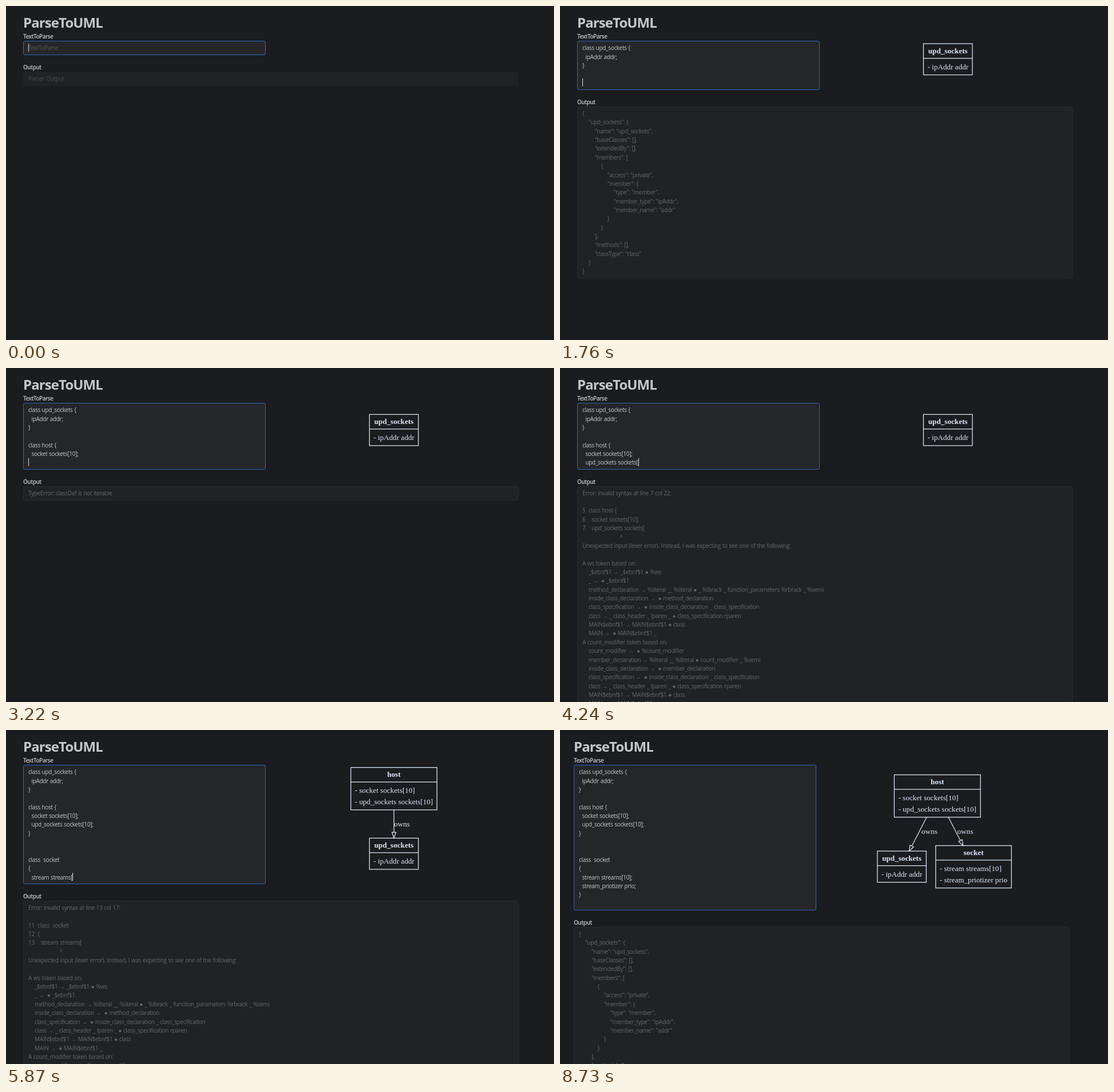
Animation of 958x585 px, one loop 8810 ms. Source, as an HTML page:

```html
<!DOCTYPE html>
<html lang="en">
<head>
<meta charset="utf-8">
<title>ParseToUML</title>
<style>
html, body { margin: 0; width: 100%; height: 100%; overflow: hidden; background: #1b1c1f; }
#page { position: absolute; inset: 0; color: #c6c7ca; font: 10px "Open Sans", "Noto Sans", sans-serif; }
#page > * { position: absolute; box-sizing: border-box; margin: 0; }
h1 { left: 30px; top: 13px; font-size: 24px; line-height: 32px; letter-spacing: -.9px; }
.label { left: 30px; font-size: 10px; font-weight: 600; line-height: 16px; letter-spacing: -.5px; }
pre { left: 30px; padding: 4.2px 8px 0; border: 1px solid; border-radius: 3px; overflow: hidden;
  font: inherit; line-height: 15.36px; letter-spacing: -.31px; word-spacing: .45px; }
#input { top: 61px; width: 424px; background: #25262a; border-color: #3065ba; }
#input.empty { color: #56575b; }
#output { width: 866px; background: #212225; border-color: #2a2b2e; color: #646568; }
#output.empty { border-color: #212225; color: #46474a; }
#caret { width: 1px; height: 14px; background: #e4e4e4; }
svg { left: 0; top: 0; width: 958px; height: 585px; font: 13.15px "Liberation Serif", serif; fill: #dce8fb; }
svg path, svg rect { fill: none; stroke: #dce8fb; stroke-width: 1.25; }
</style>
</head>
<body>
<div id="page">
  <h1>ParseToUML</h1>
  <div class="label" style="top:45px">TextToParse</div>
  <pre id="input"></pre>
  <div id="caret"></div>
  <div class="label" id="outLabel">Output</div>
  <pre id="output"></pre>
  <svg><g id="diagram"></g></svg>
</div>
<script>
const LOOP = 8810, ROW = 15.36, TOP = 61;
const SOURCE = `class upd_sockets {
  ipAddr addr;
}

class host {
  socket sockets[10];
  upd_sockets sockets[10];
}


class  socket
{
  stream streams[10];
  stream_priotizer prio;
}
`;
// [time in ms, characters typed]
const KEYS = [[133, 0], [950, 20], [1760, 38], [1833, 38], [2290, 51], [2353, 51], [3220, 73],
  [4590, 105], [5870, 137], [7010, 167], [7100, 167], [7150, 169]];
const $ = id => document.getElementById(id);

function typedAt(t) {
  if (t < KEYS[0][0]) return 0;
  for (let i = 1; i < KEYS.length; i++) {
    const [t0, a] = KEYS[i - 1], [t1, b] = KEYS[i];
    if (t >= t1) continue;
    const steps = Math.max(1, Math.round((t1 - t0) / 67));
    const k = Math.floor((t - t0) / (t1 - t0) * steps);
    return a + Math.round((b - a) * k / steps);
  }
  return SOURCE.length;
}

const MAIN_RULES = ['MAIN$ebnf$1 → MAIN$ebnf$1 ● class', 'MAIN →  ● MAIN$ebnf$1 _'];
const WS_RULES = ['_$ebnf$1 → _$ebnf$1 ● %ws', '_ →  ● _$ebnf$1'];
const BODY_RULES = kind => [
  `inside_class_declaration →  ● ${kind}_declaration`,
  'class_specification →  ● inside_class_declaration _ class_specification',
  'class → _ class_header _ lparen _ ● class_specification rparen',
  ...MAIN_RULES];
const expected = (token, rules) => [`A ${token} token based on:`, ...rules.map(r => '    ' + r)];

function report(kind, lines, col, cause, tokens) {
  const n = lines.length, pad = String(n).length;
  const context = lines.slice(-3).map((s, i, a) => String(n - a.length + 1 + i).padStart(pad) + '  ' + s);
  return [`Error: ${kind} at line ${n} col ${col}:`, '', ...context, ' '.repeat(pad + 1 + col) + '^',
    `Unexpected ${cause}. Instead, I was expecting to see one of the following:`, '', ...tokens, ''];
}

function toJson(text) {
  const out = {};
  for (const [, name, body] of text.matchAll(/class\s+(\w+)\s*{([^}]*)}/g)) {
    const members = [...body.matchAll(/(\w+) (\w+)/g)].map(m => ({
      access: 'private',
      member: { type: 'member', member_type: m[1], member_name: m[2] }
    }));
    out[name] = { name, baseClasses: [], extendedBy: [], members, methods: [], classType: 'class' };
  }
  return JSON.stringify(out, null, 4).split('\n');
}

const isValid = text => /}\s*$/.test(text);

function parse(text) {
  const lines = text.split('\n'), last = lines[lines.length - 1];
  if (!text) return ['Parser Output'];
  if (isValid(text)) return toJson(text);
  if (/^c(l|la|las)?$/.test(last))
    return report('Syntax error', lines, 1, `literal token: "${last}"`, [
      ...expected('ws', [...WS_RULES, 'MAIN → MAIN$ebnf$1 ● _']),
      ...expected('class_specifier', [
        'class_header →  ● %class_specifier __ %literal class_extention_specializer',
        'class → _ ● class_header _ lparen _ class_specification rparen', ...MAIN_RULES])]);
  if (/\[\d*$/.test(last))
    return report('invalid syntax', lines, last.indexOf('[') + 1, 'input (lexer error)', [
      ...expected('ws', [...WS_RULES,
        'method_declaration → %literal __ %literal ● _ %lbrack _ function_parameters %rbrack _ %semi',
        ...BODY_RULES('method')]),
      ...expected('count_modifier', ['count_modifier →  ● %count_modifier',
        'member_declaration → %literal __ %literal ● count_modifier _ %semi',
        ...BODY_RULES('member')])]);
  return ['TypeError: classDef is not iterable'];
}

function box(x, y, w, title, ...members) {
  const h = 35 + 19.6 * members.length;
  return `<rect x="${x}" y="${y}" width="${w}" height="${h}"/><path d="M${x} ${y + 25.5}h${w}"/>` +
    `<text x="${x + w / 2}" y="${y + 16.6}" text-anchor="middle" font-weight="bold">${title}</text>` +
    members.map((m, i) => `<text x="${x + 7}" y="${y + 44.6 + 19.7 * i}">- ${m}</text>`).join('');
}

function edge(x0, y0, x1, y1, labelX, labelY) {
  const len = Math.hypot(x1 - x0, y1 - y0), ux = (x1 - x0) / len, uy = (y1 - y0) / len;
  const bx = x1 - ux * 10, by = y1 - uy * 10, px = -uy * 3.5, py = ux * 3.5;
  return `<path d="M${x0} ${y0}L${bx} ${by}M${bx + px} ${by + py}L${x1} ${y1}L${bx - px} ${by - py}Z"/>` +
    `<text x="${labelX}" y="${labelY}">owns</text>`;
}

// Diagrams are laid out around y = 0
const upd = (x, y) => box(x, y, 85.5, 'upd_sockets', 'ipAddr addr');
const host = (x, y) => box(x, y, 150.6, 'host', 'socket sockets[10]', 'upd_sockets sockets[10]');
const DIAGRAMS = [
  '',
  upd(635.4, -27.6),
  host(602.8, -89.4) + edge(678.2, -15.2, 678.2, 34, 678.2, 13.8) + upd(635.4, 34.4),
  host(590.4, -99.6) + edge(647, -25.4, 616.5, 34, 638, 3.8) + edge(685, -25.4, 710.5, 24.3, 700.5, 3.8) +
    upd(560.8, 34) + box(662.8, 24.4, 132.4, 'socket', 'stream streams[10]', 'stream_priotizer prio')
];
const drawnAt = n => n < 38 ? 0 : n < 103 ? 1 : n < 169 ? 2 : 3;

let shown = -1;
function render(n) {
  const text = SOURCE.slice(0, n), rows = text.split('\n').length, out = parse(text), kind = drawnAt(n);
  const input = $('input'), output = $('output');
  const fit = kind === 2 ? Math.max(rows, 10.85) : rows;
  const height = lines => Math.max(25.2, 9 + ROW * lines);
  const bottom = TOP + height(fit);

  input.className = output.className = n ? '' : 'empty';
  input.textContent = text;
  const mark = document.createElement('span');
  input.append(mark, n ? '' : 'TextToParse');
  input.style.height = height(rows) + 'px';
  $('caret').style.left = 30 + Math.max(9, Math.round(mark.offsetLeft + 1)) + 'px';
  $('caret').style.top = Math.round(TOP + 4.6 + ROW * (rows - 1)) + 'px';

  $('outLabel').style.top = bottom + 13 + 'px';
  output.style.top = bottom + 29 + 'px';
  output.style.height = height(out.length) + 'px';
  output.textContent = out.join('\n');

  $('diagram').innerHTML = DIAGRAMS[kind];
  $('diagram').setAttribute('transform', `translate(0 ${55.2 + ROW / 2 * fit})`);
  // A long result brings in a scrollbar, which moves the centred page
  $('page').style.left = isValid(text) && kind > 1 ? '-6px' : 0;
}

function frame(now) {
  const t = now % LOOP, n = typedAt(t);
  if (n !== shown) render(shown = n);
  const off = t >= 7670 && t < 8200 || t >= 8730;
  $('caret').style.visibility = off ? 'hidden' : 'visible';
  requestAnimationFrame(frame);
}
frame(0);
</script>
</body>
</html>
```
